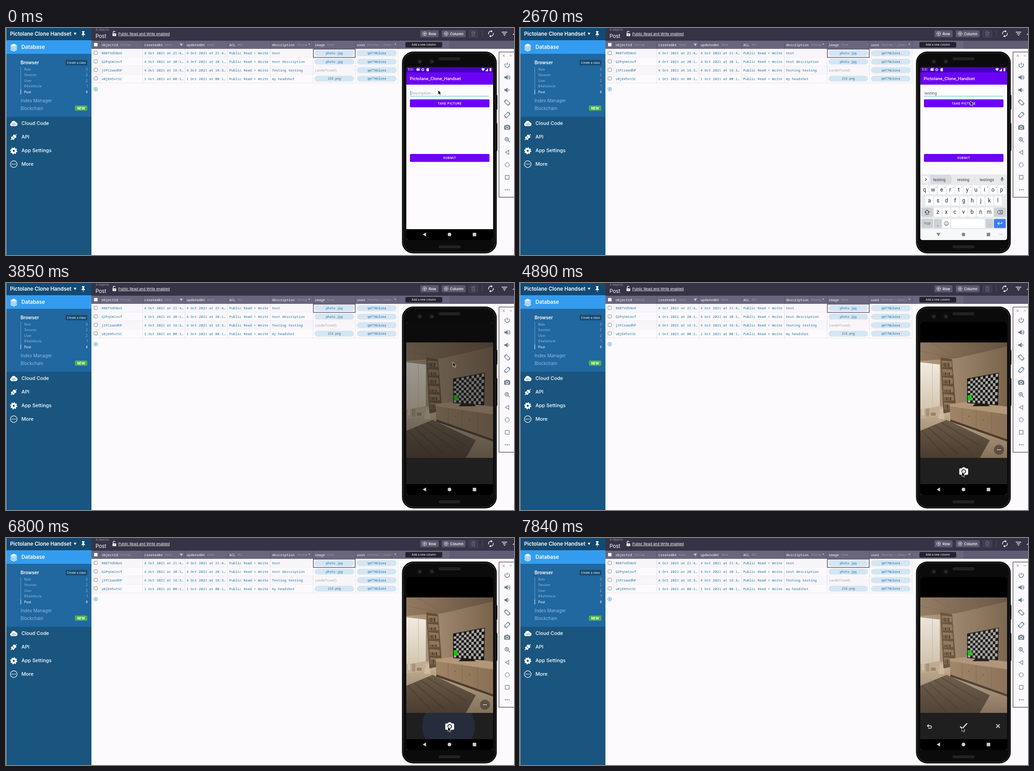
An HTML page that plays this animation: 1118 px wide and 501 px high, repeating every 7.99 s.

```html
<!DOCTYPE html>
<html lang="en">
<head>
<meta charset="utf-8">
<title>App demo</title>
<style>
html,body{margin:0;width:100%;height:100%;overflow:hidden;background:#fcfafc}
svg{display:block;width:100vw;height:100vh}
text{font-family:Inter,"Open Sans",sans-serif;white-space:pre}
.m{font-family:"Noto Sans Mono","DejaVu Sans Mono",monospace}
.r{font-family:Roboto,"Noto Sans",sans-serif}
</style>
</head>
<body>
<svg id="stage" viewBox="0 0 1118 501"></svg>
<script>
const APP = 'Pictolane Clone Handset', USER = 'qmT7WLbzea';
const PURPLE = '#6c02f5', TEAL = '#35c9bd', DARK = '#1f1f1f';

// Markup helpers; text is centred vertically on y
const R = (x, y, w, h, fill, r = 0, more = '') =>
  `<rect x="${x}" y="${y}" width="${w}" height="${h}" rx="${r}" fill="${fill}" ${more}/>`;
const C = (x, y, r, fill, more = '') => `<circle cx="${x}" cy="${y}" r="${r}" fill="${fill}" ${more}/>`;
const F = (d, fill, more = '') => `<path d="${d}" fill="${fill}" ${more}/>`;
const S = (d, color, w = 1, more = '') => `<path d="${d}" fill="none" stroke="${color}" stroke-width="${w}" ${more}/>`;
const T = (x, y, s, size, fill = '#fff', more = '') =>
  `<text x="${x}" y="${(y + size * .36).toFixed(2)}" font-size="${size}" fill="${fill}" ${more}>${s}</text>`;
const G = (id, body, more = '') => `<g id="${id}" ${more}>${body}</g>`;
const at = (x, y, body) => `<g transform="translate(${x} ${y})">${body}</g>`;
const mid = 'text-anchor="middle"', mono = 'class="m"', rob = 'class="r"';

function sidebar() {
  let s = R(0, 0, 188, 501, '#19557f') + R(0, 0, 188, 27, '#124a73') +
    R(0, 27, 188, 30, '#339cf0') + R(0, 57, 188, 139, '#2167a0') + R(0, 0, 1, 501, '#9db4c4');
  s += T(9, 13, APP, 11.4, '#fff', 'font-weight="600"') + F('M149 10.5h6l-3 5z', '#fff');
  s += at(170, 12, F('M-3-5h6v1.3l-1.2 1v3l2 2v1.2h-3.3v4h-1v-4h-3.3v-1.2l2-2v-3l-1.2-1z', '#fff'));
  s += at(17, 42, F('M-7-4L0-7.5 7-4 0-.5z', '#fff') +
    [0, 3.6, 7.2].map(y => F(`M-7 ${y - 3}L0 ${y + .5} 7 ${y - 3}v2L0 ${y + 2.6}-7 ${y - 1}z`, '#fff')).join(''));
  s += T(34, 42, 'Database', 11.3, '#fff', 'font-weight="600"');
  s += T(32, 76.5, 'Browser', 10.1, '#fff', 'font-weight="600"');
  s += R(131, 70.5, 48, 12, '#174a70', 2) + T(155, 76.5, 'Create a class', 6.2, '#fff', mid);
  s += R(32, 86, 1, 61, '#6fa3cb');
  [['Role', 0], ['Session', 2], ['User', 2], ['B4aVehicle', 1], ['Post', 4]].forEach(([name, n], i) => {
    const col = i == 4 ? '#fff' : '#8fbbdd', y = 91 + i * 12.5;
    s += T(40, y, name, 7.3, col) + T(180, y, n, 7.3, col, 'text-anchor="end"');
  });
  s += R(32, 136, 1, 10, '#fff');
  s += T(32, 160, 'Index Manager', 9.8, '#8fbbdd') + T(32, 177.5, 'Blockchain', 9.7, '#8fbbdd');
  s += R(151.5, 171, 27.5, 11.5, '#4caf50', 2) + T(165.3, 177, 'NEW', 7.2, '#fff', mid + ' font-weight="700"');
  ['Cloud Code', 'API', 'App Settings', 'More'].forEach((t, i) =>
    s += T(34, 210.3 + i * 30, t, 10.8, '#fff', 'font-weight="500"'));
  s += at(17, 211, F('M-4.5 5.5a3.7 3.7 0 0 1-.6-7.2A5 5 0 0 1 4.4-3 4.3 4.3 0 0 1 4.8 5.5z', '#fff') +
    S('M-2-.5l-2 2 2 2M2-.5l2 2-2 2M.7-1.2l-1.4 5', '#19557f', .9));
  s += at(17, 241, `<g transform="rotate(45)">${R(-4, -5, 8, 4.5, '#fff', 1)}${R(-4, .8, 8, 4.5, '#fff', 1)}${
    R(-2.7, -1, 1.4, 2, '#fff')}${R(1.3, -1, 1.4, 2, '#fff')}${R(-.8, -9, 1.6, 4, '#fff')}${R(-.8, 5, 1.6, 4, '#fff')}</g>`);
  s += at(17, 271, C(0, 0, 4.2, 'none', 'stroke="#fff" stroke-width="4"') +
    C(0, 0, 6.6, 'none', 'stroke="#fff" stroke-width="2.4" stroke-dasharray="2.6 2.58"'));
  s += at(17, 300.5, C(0, 0, 7.3, 'none', 'stroke="#fff" stroke-width="1.2"') + [-3.3, 0, 3.3].map(x => C(x, 0, 1.1, '#fff')).join(''));
  return s;
}

function table() {
  let s = R(188, 0, 930, 28, '#353446') + R(188, 28, 930, 18, '#5f5c73') + R(188, 28, 788, 18, '#69667d');
  s += T(197, 3.5, '4 objects', 6.8, '#9a98aa') + T(197, 18, 'Post', 11.4);
  s += at(238.5, 13, R(-4, -1, 8, 6, '#fff', 1) + S('M-2.6-1v-2.3a2.2 2.2 0 0 1 4.4-.6', '#fff', 1.3) + C(0, 2, 1, '#353446'));
  s += T(247, 13, 'Public Read and Write enabled', 7.85, '#fff', 'text-decoration="underline"');
  [[912, 40, 'Row'], [959, 52.5, 'Column']].forEach(([x, w, t]) => {
    s += R(x, 5, w, 15.5, '#5b586e', 2.5) + S(`M${x + 7} 12.7h5M${x + 9.5} 10.2v5`, '#fff', .9) +
      C(x + 9.5, 12.7, 4.2, 'none', 'stroke="#fff" stroke-width=".9"') + T(x + 18, 12.7, t, 8.1, '#fff', 'font-weight="500"');
  });
  s += R(1019, 5, 19, 15.5, '#3d3b4e', 2.5, 'stroke="#55526a" stroke-width=".8"') +
    S('M1024 9.5h9M1027 9.5v-1.7h3v1.7M1025 9.5l.6 8h5.8l.6-8M1027.4 11.5v4M1029.6 11.5v4', '#77748a', .9);
  s += R(1048, 5, .8, 15, '#55526a');
  s += S('M1062 14a5.4 5.4 0 0 1 6-6.9M1072.4 11a5.4 5.4 0 0 1-6 6.900', '#fff', 1.4) +
    F('M1067.500 4.500l3.500 2.800-3.500 2.800zM1067 15.300v5.400l-3.500-2.700z', '#fff');
  s += S('M1091 9.2h12M1093.5 12.7h7M1095.8 16.2h2.6', '#fff', 1.4) + S('M1115.5 15l3-3', '#fff', 1.2);

  const xs = [207, 301, 394, 488, 582, 676, 769, 863];
  const heads = [['objectId', 'String'], ['createdAt', 'Date'], ['updatedAt', 'Date'], ['ACL', 'ACL'],
    ['description', 'String'], ['image', 'File'], ['user', 'Pointer &lt;_User&gt;']];
  heads.forEach(([name, type], i) => {
    const x = xs[i] + 3.4;
    s += T(x, 37, name, 7.5, '#fff', mono + ' font-weight="500"') + T(x + name.length * 4.5 + 5.4, 37, type, 6.1, '#a9a7b8', mono);
  });
  s += F('M382 34.5h7.6l-3.8 5.2z', '#c9c7d4') + T(665, 37, '*', 7.5, '#fff', mono) + T(854.5, 37, '*', 7.5, '#fff', mono);
  s += R(879, 31, 81, 12, '#24222e', 2) + T(919.5, 37, 'Add a new column', 6.1, '#fff', mid);

  const rows = [['RB8TVdSNrO', '4 Oct 2021 at 21:4…', 'test', 'photo.jpg'], ['Q2Pqtm1nvf', '4 Oct 2021 at 20:1…', 'test description', 'photo.jpg'],
    ['jtFCraedhP', '4 Oct 2021 at 16:3…', 'Testing testing', ''], ['v0jEH5vtSC', '1 Oct 2021 at 00:1…', 'my headshot', '218.png']];
  const blue = '#1f70a8';
  const pill = (x, y, t) => R(x, y - 6.5, 87, 13, '#d5e5f2', 6.5) + T(x + 43.5, y, t, 6.85, blue, mono + ' ' + mid);
  rows.forEach(([id, date, text, file], i) => {
    const y = 55.6 + i * 18.75;
    s += R(188, y - 9.4, 675, 18.75, i % 2 ? '#fcfafc' : '#f8f6f9') + R(188, y + 9, 675, .8, '#e2e0e8');
    [id, date, date, 'Public Read + Write', text].forEach((t, j) => s += T(xs[j] + 3.2, y, t, 7.55, blue, mono));
    s += file ? pill(679, y, file) : T(679.5, y, '(undefined)', 7.4, '#a2a0a8', mono);
    s += pill(772.5, y, USER);
    s += R(193.8, y - 4.4, 7.4, 7.4, '#fff', 1.4, 'stroke="#74727c" stroke-width=".9"');
  });
  s += R(193.8, 33, 7.6, 7.6, '#fff', 1.2);
  xs.forEach(x => s += R(x - .5, 28, .9, 18, '#55526a') + R(x - .5, 46, .8, 75.5, '#e2e0e8'));
  s += R(676.5, 46.7, 92, 18.2, 'none', 0, 'stroke="#52516e" stroke-width="1.4"');
  s += C(197.5, 135, 4, 'none', 'stroke="#2b96dc" stroke-width=".9"') + S('M195.2 135h4.6M197.5 132.7v4.6', '#2b96dc', .9);
  return s;
}

function tools() {
  const c = '#65798a', x = 1103;
  let s = R(1085, 53, 40, 320.5, '#fbf9fb', 0, 'stroke="#4d3b47" stroke-width="1.2"');
  s += S('M1093 59l4.5 4.5M1097.5 59l-4.5 4.5M1108.5 61.3h5', '#777', .9);
  const put = (y, body) => s += at(x, y, body);
  const horn = F('M-6-2h3l4-3.5v11L-3 2h-3z', c);
  const turn = `<g transform="rotate(-45)">${R(-3.2, -5.4, 6.4, 10.8, 'none', .8, `stroke="${c}" stroke-width="1.2"`)}</g>` +
    S('M-6.5-1a6.5 6.5 0 0 1 5.5-5.500M6.5 1a6.5 6.5 0 0 1-5.5 5.5', c, 1.1);
  put(82, S('M-3.5-3.5a5 5 0 1 0 7 0M0-6v6', c, 1.5));
  put(109, horn + S('M2.5-2.5a3 3 0 0 1 0 5M3-5a5.5 5.5 0 0 1 0 10', c, 1.2));
  put(137, horn + S('M2.5-2.5a3 3 0 0 1 0 5', c, 1.2));
  put(164.5, turn);
  put(192, `<g transform="scale(-1 1)">${turn}</g>`);
  put(219, camera(.65, c, '#fbf9fb'));
  put(246.5, C(-1, -1, 3.8, 'none', `stroke="${c}" stroke-width="1.4"`) + S('M2 2l4 4M-3-1h4M-1-3v4', c, 1.2));
  put(274.5, S('M3.5-4.5v9l-7.5-4.5z', c, 1.2));
  put(302, C(0, 0, 4.5, 'none', `stroke="${c}" stroke-width="1.2"`));
  put(329.5, R(-4.2, -4.2, 8.4, 8.4, 'none', 0, `stroke="${c}" stroke-width="1.2"`));
  put(357, [-4, 0, 4].map(d => C(d, 0, 1.2, c)).join(''));
  return s;
}

function camera(k, fill, hole) {
  return `<g transform="scale(${k})">${F('M-8-6h3.5l2-2.5h5l2 2.5H8q2 0 2 2V6.5q0 2-2 2H-8q-2 0-2-2V-4q0-2 2-2z', fill)}${
    C(0, 1, 4.2, 'none', `stroke="${hole}" stroke-width="2"`)}</g>`;
}

function navIcons(id, color, down) {
  return G(id, at(921, 455.7, F('M3.5-4.5v9l-7.5-4.5z', color, `class="back" transform="rotate(${down ? -90 : 0})"`)) +
    C(976, 455.7, 3.9, color) + R(1027.2, 452, 7.6, 7.6, color));
}

function button(y, label) {
  return R(889, y, 175, 17.6, PURPLE, 2) +
    T(976.5, y + 8.9, label, 6.8, '#fff', `${rob} ${mid} font-weight="500" letter-spacing=".6"`);
}

function appScreen() {
  return R(881, 86, 191, 382, '#fdfbfd') + R(881, 98, 191, 27, PURPLE) + R(881, 86, 191, 12, '#4200bd') +
    T(888.5, 111.8, APP.replace(/ /g, '_'), 9.85, '#fff', rob + ' font-weight="500"') +
    '<text id="field" class="r" x="890.3" y="147" font-size="8.9"></text>' + R(890, 150, 172, 1, TEAL) +
    R(890, 138, 1, 11, TEAL, 0, 'id="caret"') + button(157.5, 'TAKE PICTURE') +
    C(990, 166, 0, '#fff', 'id="tap" opacity=".2" clip-path="url(#btn)"') + button(278, 'SUBMIT');
}

function status() {
  return T(884.5, 92, '5:51', 6.6, '#fff', rob) + R(903.5, 89.5, 6, 5, '#fff', .8) + R(905, 88.3, 6, 5, 'none', .8, 'stroke="#fff" stroke-width=".7"') +
    C(917.3, 92, 2.3, 'none', 'stroke="#fff" stroke-width="1.8" stroke-dasharray="1.4 .4"') +
    F('M925.5 90.2l1.7-1.7h3.3v7h-5z', '#fff') + F('M1046 90a6 6 0 0 1 8 0l-4 5.5z', '#fff') +
    F('M1061 88.5v7h-6.5z', '#fff') + R(1064.3, 88.5, 3.8, 7, '#fff', .6);
}

function keyboard() {
  const ink = '#3a3d42', gray = '#ccd1d6';
  const key = (x, y, w, fill = '#fff') => R(x - w / 2, y - 10, w, 20, fill, 2.5);
  let s = R(881, 323, 191, 145, '#e8eaed') + R(881, 444, 191, 24, '#f7f8f9');
  s += R(903, 324, 46, 20, '#d7dade', 2, 'id="pick"') + R(949, 328, .7, 12, '#cfd2d6') + R(1001.5, 328, .7, 12, '#cfd2d6');
  s += C(893, 334, 7, '#fff') + S('M891.7 331l3 3-3 3', ink, 1.1);
  [923, 975.5, 1027.5].forEach((x, i) => s += T(x, 334.3, '', 8.9, ink, `id="s${i}" ${rob} ${mid}`));
  s += R(1059.5, 329, 3, 6, '#555', 1.5) + S('M1057.7 333a3.3 3.3 0 0 0 6.6 0M1061 336.5v2.5', '#555', .9);
  [['qwertyuiop', 891, 357], ['asdfghjkl', 901, 381.5], ['zxcvbnm', 919.5, 406.5]].forEach(([letters, x0, y], row) =>
    [...letters].forEach((ch, i) => {
      const x = x0 + i * 18.85;
      s += key(x, y, 16.6) + T(x - (row ? 0 : .8), y - .6, ch, 12, '#202124', rob + ' ' + mid);
      if (!row) s += T(x + 6, y - 6, (i + 1) % 10, 4.3, '#555', rob + ' ' + mid);
    }));
  s += key(896, 406.5, 26, gray) + S('M896 401.5l5 5h-2.5v4.5h-5v-4.5h-2.5z', ink, 1.1);
  s += key(1056, 406.5, 26, gray) + S('M1050 406.5l3.5-4h8v8h-8zM1055.5 404.5l4 4M1059.5 404.5l-4 4', ink, 1);
  s += key(896, 431.5, 26, gray) + T(896, 431.5, '?123', 6.8, ink, rob + ' ' + mid);
  s += key(919.5, 431.5, 16.6, gray) + T(919.5, 432, ',', 10, ink, rob + ' ' + mid);
  s += key(938.3, 431.5, 16.6) + C(938.3, 431.5, 4.6, 'none', `stroke="${ink}" stroke-width=".9"`) +
    C(936.7, 430.2, .7, ink) + C(939.9, 430.2, .7, ink) + S('M935.8 432.8q2.5 2.6 5 0', ink, .9);
  s += key(985.5, 431.5, 74) + key(1033, 431.5, 16.6, gray) + T(1033, 431, '.', 10, ink, rob + ' ' + mid);
  s += key(1056, 431.5, 26, '#3b7ded') + S('M1060.5 428v3.5h-9M1054.5 428.5l-3 3 3 3', '#fff', 1.2);
  s += navIcons('kbNav', '#85878a', true) + S('M1055 454.5h7M1055 456.5h7', '#aaa', .8, 'stroke-dasharray="1 .5"');
  return s;
}

// Flat rendering of the room seen by the camera
function room() {
  const poly = (pts, fill, more = '') => F('M' + pts + 'z', fill, more);
  let s = R(881, 131.5, 191, 254.5, 'url(#wall)');
  // Ceiling and window
  s += poly('881 131.5H1072V140L962 166 881 172', 'url(#ceiling)');
  s += S('M881 150L960 166M905 131.5L963 165M1000 131.5L966 165', '#6b5640', .7, 'opacity=".6"');
  s += poly('881 175L924 180V272L881 280', 'url(#window)') + R(907, 178, 1, 97, '#c9baa2');
  s += poly('881 279L926 272 946 280 947 292 881 300', '#c0ad92') + poly('881 300L947 290 1072 347V386H881', 'url(#floor)');
  // Shelf
  s += poly('925 164L951 168 960 282 932 288', '#66503a');
  for (let i = 0; i < 6; i++) {
    const y = 171 + i * 18.5, x = 928 + i;
    s += poly(`${x} ${y}L${x + 22} ${y + 2} ${x + 23} ${y + 14} ${x + 1} ${y + 15}`, '#8f775c');
    for (let j = 0; j < 4; j++) {
      const gap = (i * 3 + j * 5) % 5;
      s += R(x + 2 + j * 4, y + 5 + gap, 2.8, 9 - gap, j % 2 ? '#4f3d2c' : '#6d553e');
    }
  }
  // Rug
  s += poly('881 326L939 302 1034 347 1012 386H881', 'url(#rug)');
  for (let i = 0; i < 4; i++) s += S(`M${885 + i * 14} ${326 - i * 6}L${940 + i * 24} ${386 - i * 9}`, '#3d3227', 3, 'opacity=".35"');
  // Cabinet and screen
  s += poly('945 267L988 262 1072 273V291L946 273', '#b29778') + poly('946 272L1072 290V347L947 302', 'url(#wood)') + poly('947 301L1072 345V350L947 306', '#4c3c2d');
  s += S('M973 276v35M1004 280.5v42M1038 285v50', '#7a6046', .8) + C(988, 294, 1, '#5a4532') + C(1020, 302, 1, '#5a4532');
  s += poly('1003 265H1027L1034 272H996', '#211d19') + poly('984 211L1054 198 1052 270 984 265', '#15130f');
  const pt = (u, v) => `${(985.5 + u * 67 - u * v * 2).toFixed(1)} ${(212.5 - u * 13 + v * (51 + u * 18)).toFixed(1)}`;
  const nx = 12, ny = 10;
  for (let i = 0; i < nx; i++) for (let j = 0; j < ny; j++) if ((i + j) % 2)
    s += poly([pt(i / nx, j / ny), pt((i + 1) / nx, j / ny), pt((i + 1) / nx, (j + 1) / ny), pt(i / nx, (j + 1) / ny)].join('L'), '#a8a8a8');
  s += poly('985.5 247.5L994 247 994 259.5 985.5 259', '#13c70d');
  // Cat and vases
  s += F('M921 300q-2-10 3-15l-1-9 2.5 3h3l2.5-3v9q5 6 2 15z', '#cdbb9f') + R(885, 278, 4, 14, '#d7c8b0', 2) + R(893, 277, 8, 18, '#a8947a', 3) + R(904, 286, 11, 7, '#98836a', 2);
  return s;
}

function sheet() {
  const preview = R(881, 86, 191, 46, '#000') + room() + R(881, 131.5, 191, 254.5, '#a39b8e', 0, 'id="veil" opacity=".08"') +
    G('more', C(1054, 368, 11, '#4b4135', 'opacity=".75"') + [-3, 0, 3].map(d => C(1054 + d, 368, 1.1, '#fff')).join(''));
  const review = S('M897 414.5h6a2.7 2.7 0 0 1 0 5.4h-5M899.5 411.5l-3 3 3 3', '#fff', 1.3) +
    S('M968.5 416l4.7 4.8L984 409', '#fff', 2) + S('M1048 411l8 8M1056 411l-8 8', '#fff', 1.5);
  return R(881, 86, 191, 382, DARK) + G('splash', at(976.5, 265, camera(1.25, '#707070', DARK))) + G('preview', preview) +
    C(974, 416, 0, '#252c3c', 'id="ring" clip-path="url(#bar)"') + G('shutter', at(976.5, 415, camera(.97, '#fff', DARK))) +
    G('review', review) + R(881, 444, 191, 24, '#000') + navIcons('camNav', '#cfcfcf');
}

function phone() {
  let s = R(1077, 148, 4.5, 32, '#111', 1) + R(1077, 210, 4.5, 61, '#111', 1);
  s += R(872, 52.5, 207.5, 444.5, '#0b0b0b', 24, 'stroke="#000" stroke-width="1"') + R(874.5, 55, 202.5, 439.5, 'none', 22, 'stroke="#3a3a3a" stroke-width="1"');
  s += [65.5, 480.5].map(y => R(952.5, y, 47, 5, '#202020', 2.5, 'stroke="#333" stroke-width=".8"')).join('');
  s += [910.5, 937].map(x => C(x, 74, 5, '#1d1d1d') + C(x + 1, 74.5, 2, '#343434')).join('');
  const inner = G('app', appScreen()) + G('dark', R(881, 444, 191, 24, '#000') + navIcons('appNav', '#cfcfcf')) +
    G('kbd', keyboard()) + status() + G('sheet', sheet());
  return s + `<g clip-path="url(#screen)">${inner}</g>`;
}

const grad = (id, a, b, dir = 'x2="0" y2="1"') =>
  `<linearGradient id="${id}" ${dir}><stop stop-color="${a}"/><stop offset="1" stop-color="${b}"/></linearGradient>`;
const clip = (id, ...box) => `<clipPath id="${id}">${R(...box)}</clipPath>`;
const defs = grad('wall', '#b39d80', '#79634c', '') + grad('ceiling', '#917a60', '#66523e', '') +
  grad('window', '#f1ebe0', '#d3c5ae') + grad('floor', '#bda98e', '#857059') +
  grad('rug', '#6b5a48', '#4a3d30') + grad('wood', '#a08466', '#8a7056', '') +
  clip('screen', 881, 86, 191, 382, '#000', 5) + clip('btn', 889, 157.5, 175, 17.6, '#000', 2) + clip('bar', 881, 386, 191, 58, '#000');
document.getElementById('stage').innerHTML = `<defs>${defs}</defs>` +
  R(0, 0, 1118, 501, '#fcfafc') + sidebar() + table() + tools() + phone() +
  G('mouse', F('M0 0V10L2.3 8 4 11.6 5.7 10.9 4.2 7.4H7.2z', '#000', 'stroke="#fff" stroke-width=".8"'));

const $ = id => document.getElementById(id);
const set = (id, props) => { for (const p in props) $(id).setAttribute(p, props[p]); };
const show = (id, on) => set(id, { display: on ? 'inline' : 'none' });
const zoom = (s, dy = 0) => `translate(976.5 ${277 + dy}) scale(${s}) translate(-976.5 -277)`;
const turnBack = (id, deg) => document.querySelector(`#${id} .back`).setAttribute('transform', `rotate(${deg})`);

// [step, ...value]; the latest entry holds
const hold = (list, k) => list.filter(e => e[0] <= k).pop();
const typed = [[0, ''], [7, 't'], [8, 'te'], [10, 'test'], [12, 'testi'], [13, 'testin'], [14, 'testing']];
const hints = [[0, 't', 'to', 'the'], [8, 'te', 'the', 'yet'], [10, 'tes', 'test', 'yes'], [11, 'test', 'tests', 'rest'],
  [13, 'testi', 'testing', 'test'], [14, 'testin', 'testing', 'resting'], [15, 'testing', 'resting', 'testings']];
const path = [[0, 951, 137], [16, 951, 137], [17, 984, 155], [18, 991, 161], [22, 991, 161], [23, 985, 165], [27, 983, 178],
  [30, 979, 330], [32, 973, 412], [33, 972.5, 417], [51, 972.5, 417], [52, 973, 418], [53, 972.5, 417]];

function mouseAt(k) {
  const i = path.findIndex(p => p[0] > k), a = path[i < 0 ? path.length - 1 : i - 1], b = path[i] || a;
  const f = b === a ? 0 : (k - a[0]) / (b[0] - a[0]);
  return [1, 2].map(j => a[j] + (b[j] - a[j]) * f);
}

function draw(k) {
  const text = hold(typed, k)[1], field = $('field');
  field.textContent = text || 'Description...';
  field.setAttribute('fill', text ? '#55555a' : '#aaa8ac');
  set('caret', { x: text ? 890.7 + field.getComputedTextLength() : 890 });
  show('caret', k < 17 && k != 2 && k != 5);
  hold(hints, k).slice(1).forEach((w, i) => $('s' + i).textContent = w);
  set('tap', { r: k == 20 ? 25 : k > 20 ? 90 : 0 });

  set('appNav', { opacity: k < 2 ? 1 : .6 });
  turnBack('appNav', k < 2 ? 0 : k == 2 ? -45 : -90);
  show('kbd', k > 5);
  const opening = k > 21;
  set('kbd', { transform: k == 6 ? 'translate(0 55)' : opening ? zoom(1.04) : '' });
  set('app', { transform: opening ? zoom(1.04, -12) : '' });

  show('sheet', opening);
  set('sheet', { transform: zoom(k == 22 ? .9 : k == 23 ? .963 : 1), opacity: k == 22 ? .5 : k == 23 ? .97 : 1 });
  set('camNav', { opacity: k < 24 ? .45 : 1 });
  turnBack('camNav', k < 24 ? -90 : 0);
  show('splash', k < 26);
  show('preview', k > 25);
  set('preview', { opacity: k == 26 ? .6 : 1 });
  show('more', k > 26 && k < 48);
  show('veil', k > 47);
  show('shutter', k > 26 && k < 49);
  set('shutter', { opacity: k == 48 ? .4 : 1 });
  set('ring', { r: { 44: 24, 45: 43, 46: 58, 47: 62 }[k] || 0, opacity: k == 47 ? .5 : 1 });
  show('review', k > 48);
  set('review', { opacity: k == 49 ? .6 : 1 });
  set('mouse', { transform: `translate(${mouseAt(k)})` });
}

const LOOP = 7990, STEP = 148, start = performance.now();
let last = -1;
function tick() {
  const t = (performance.now() - start) % LOOP;
  const k = Math.min(53, Math.floor((t + 10) / STEP));
  if (k != last) draw(last = k);
  requestAnimationFrame(tick);
}
tick();
</script>
</body>
</html>
```
